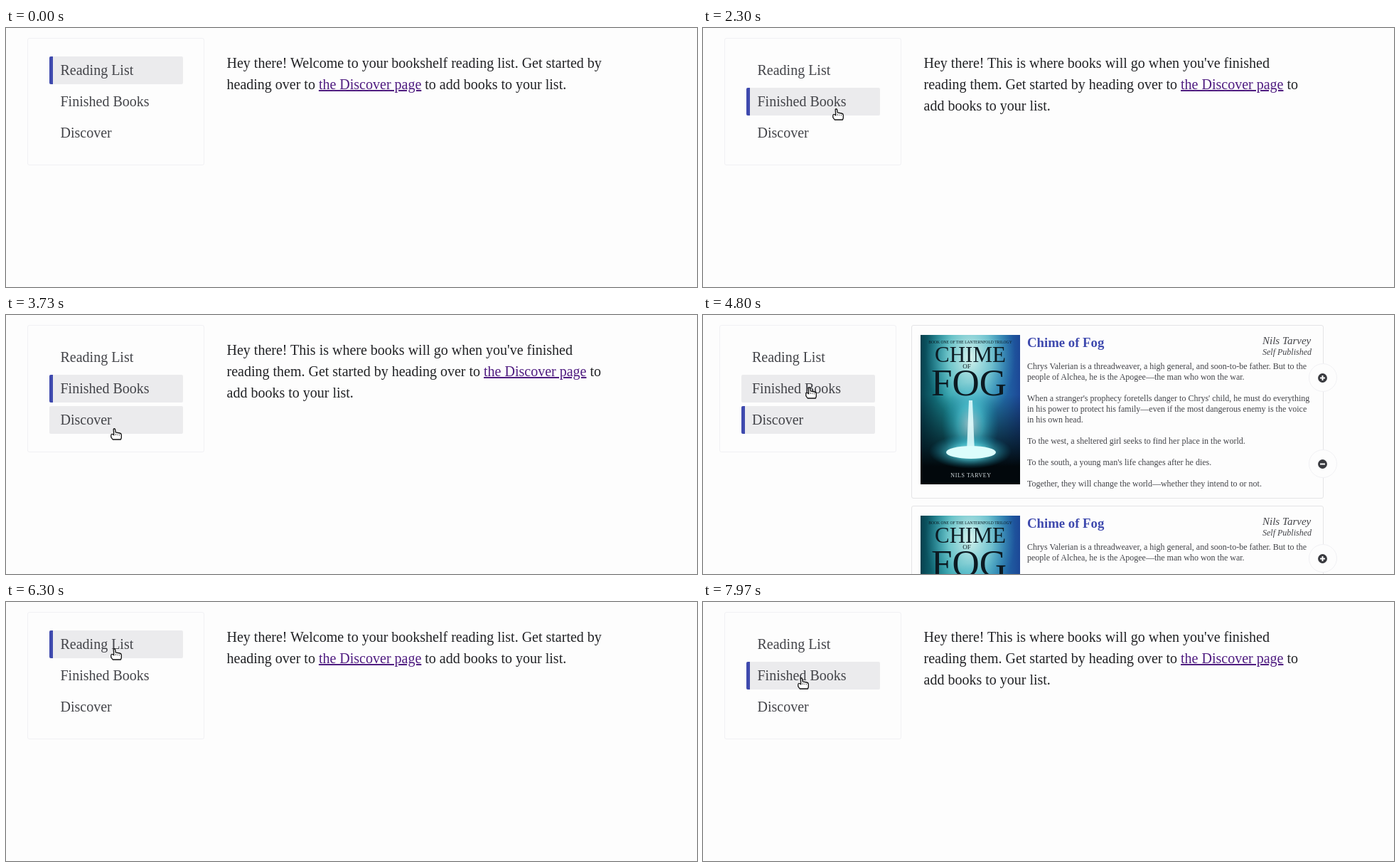
These frames come from a looping animation (972x364 px, 8000 ms). An HTML page:

```html
<!DOCTYPE html>
<html lang="en">
<head>
<meta charset="utf-8">
<title>Bookshelf</title>
<style>
  :root { --paper: #fdfdfd; --lit: #ebebed; --line: #f1f1f4; --edge: #e4e4e6; --text: #434449; --accent: #3f4aae; }
  html, body { margin: 0; width: 100%; height: 100%; overflow: hidden; background: var(--paper); }
  body { font-family: "Liberation Serif", "Times New Roman", serif; }
  .stage { position: absolute; left: 0; top: 0; width: 972px; height: 364px; overflow: hidden; color: var(--text); }
  .stage * { position: absolute; box-sizing: border-box; margin: 0; white-space: pre; }
  .stage a, .stage br { position: static; }

  /* navigation */
  nav { left: 30px; top: 14px; width: 249px; height: 179px; border: 1px solid var(--line); border-radius: 3px;
        animation: shift 8s step-end infinite; }
  .item { left: 30px; width: 188px; height: 39px; border-radius: 2px; font-size: 20px; line-height: 23px;
          padding: 8px 15px; }
  .item i { left: 0; top: 0; width: 5px; height: 39px; background: var(--accent); border-radius: 2px 0 0 2px; }
  .item:nth-child(1) { top: 25px; animation: lit1 8s step-end infinite; }
  .item:nth-child(2) { top: 69px; animation: lit2 8s step-end infinite; }
  .item:nth-child(3) { top: 113px; animation: lit3 8s step-end infinite; }

  /* pages and active markers share their timing */
  .reading { animation: reading 8s step-end infinite; }
  .finished { animation: finished 8s step-end infinite; }
  .discover { animation: discover 8s step-end infinite; }
  p.page { left: 310.5px; top: 34px; font-size: 20px; line-height: 30px; color: #212225; }
  a { color: #4f1c80; text-decoration: underline; }

  /* book cards */
  .card { left: 293px; top: 14px; width: 580px; height: 244px; border: 1px solid var(--edge); border-radius: 3px; }
  .card + .card { top: 268px; }
  .cover { left: 12px; top: 13px; width: 140px; height: 210px; }
  h2 { left: 162px; top: 13px; font-size: 18.75px; line-height: 21px; color: var(--accent); }
  .author, .press { left: 493px; font-style: italic; }
  .author { top: 13px; font-size: 15px; line-height: 16px; }
  .press { top: 30px; font-size: 12px; line-height: 14px; }
  .blurb { left: 162px; top: 49.5px; font-size: 12px; line-height: 15px; }
  .btn { left: 558px; width: 40px; height: 40px; border: 1px solid var(--line); border-radius: 50%; background: var(--paper); }
  .add { top: 53px; }
  .remove { top: 174px; }
  .btn svg { left: 12px; top: 13px; width: 13px; height: 13px; }
  .btn circle { fill: #38393e; }
  .btn path { stroke: var(--paper); stroke-width: 2; }

  .hand { left: -5px; top: 0; width: 16px; height: 17px; animation: hand 8s ease-in-out infinite; }

  @keyframes reading {
    0%, 74.375% { visibility: visible; }
    17.5%, 95%, 100% { visibility: hidden; }
  }
  @keyframes finished {
    0%, 48.375%, 74.375% { visibility: hidden; }
    17.5%, 63.375%, 95%, 100% { visibility: visible; }
  }
  @keyframes discover {
    0%, 63.375%, 100% { visibility: hidden; }
    48.375% { visibility: visible; }
  }
  /* the scrollbar moves the centred layout by half its width */
  @keyframes shift {
    0%, 63.375%, 100% { left: 30px; text-indent: .5px; }
    48.375% { left: 23px; text-indent: 0; }
  }
  @keyframes lit1 {
    0%, 70.75% { background: var(--lit); }
    17.5%, 95%, 100% { background: transparent; }
  }
  @keyframes lit2 {
    0%, 48.375%, 74.375% { background: transparent; }
    16%, 57%, 92.75%, 100% { background: var(--lit); }
  }
  @keyframes lit3 {
    0%, 63.375%, 100% { background: transparent; }
    34.5% { background: var(--lit); }
  }
  @keyframes hand {
    0%, 12.5% { transform: translate(205px, 372px); }
    16.875% { transform: translate(196px, 108px); }
    21.25% { transform: translate(196px, 106px); }
    26.625%, 31.25% { transform: translate(187px, 113px); }
    36.875% { transform: translate(152px, 157px); }
    38.75%, 55% { transform: translate(152px, 159px); }
    58.75% { transform: translate(149px, 103px); }
    60% { transform: translate(149px, 101px); }
    68.75% { transform: translate(151px, 97px); }
    70.375% { transform: translate(152px, 73px); }
    71.25%, 91.25% { transform: translate(152px, 65px); }
    94%, 100% { transform: translate(138px, 106px); }
  }
</style>
</head>
<body>
<svg width="0" height="0" style="position:absolute">
  <defs>
    <linearGradient id="sky">
      <stop offset="0" stop-color="#06404e"/>
      <stop offset=".3" stop-color="#1f9aa2"/>
      <stop offset=".6" stop-color="#2a9cc0"/>
      <stop offset="1" stop-color="#1c4796"/>
    </linearGradient>
    <radialGradient id="dawn" cx=".5" cy=".15" r=".45">
      <stop offset="0" stop-color="#d8f4ee"/>
      <stop offset=".5" stop-color="#86d2d6" stop-opacity=".75"/>
      <stop offset="1" stop-color="#3fa4bc" stop-opacity="0"/>
    </radialGradient>
    <linearGradient id="night" x2="0" y2="1">
      <stop offset=".4" stop-color="#03131c" stop-opacity="0"/>
      <stop offset=".75" stop-color="#03131c" stop-opacity=".8"/>
      <stop offset=".88" stop-color="#02080c"/>
    </linearGradient>
    <radialGradient id="glow">
      <stop offset="0" stop-color="#f2ffff"/>
      <stop offset=".45" stop-color="#58dcea" stop-opacity=".8"/>
      <stop offset="1" stop-color="#1090b0" stop-opacity="0"/>
    </radialGradient>
    <symbol id="cover" viewBox="0 0 140 210">
      <rect width="140" height="210" fill="url(#sky)"/>
      <rect width="140" height="210" fill="url(#dawn)"/>
      <rect width="140" height="210" fill="url(#night)"/>
      <ellipse cx="70" cy="125" rx="40" ry="58" fill="url(#glow)" opacity=".6"/>
      <ellipse cx="70" cy="164" rx="58" ry="24" fill="url(#glow)" opacity=".8"/>
      <path d="M68 92h5l3 72H65Z" fill="#e6ffff" opacity=".85"/>
      <ellipse cx="71" cy="165" rx="35" ry="9" fill="#dcfdfc"/>
      <g text-anchor="middle" font-family="Liberation Serif, Times New Roman, serif" fill="#0c1a22">
        <text x="70" y="12" font-size="5.6">BOOK ONE OF THE LANTERNFOLD TRILOGY</text>
        <text x="70" y="38" font-size="31">CHIME</text>
        <text x="65" y="47" font-size="9">OF</text>
        <text x="68" y="85" font-size="53">FOG</text>
        <text x="71" y="200" font-size="8" letter-spacing=".6" fill="#d4dce0">NILS TARVEY</text>
      </g>
    </symbol>
  </defs>
</svg>

<div class="stage">
  <nav>
    <div class="item"><i class="reading"></i>Reading List</div>
    <div class="item"><i class="finished"></i>Finished Books</div>
    <div class="item"><i class="discover"></i>Discover</div>
  </nav>

  <p class="page reading">Hey there! Welcome to your bookshelf reading list. Get started by<br>heading over to <a>the Discover page</a> to add books to your list.</p>
  <p class="page finished">Hey there! This is where books will go when you've finished<br>reading them. Get started by heading over to <a>the Discover page</a> to<br>add books to your list.</p>

  <div class="discover" id="results">
    <div class="card">
      <svg class="cover"><use href="#cover"/></svg>
      <h2>Chime of Fog</h2>
      <div class="author">Nils Tarvey</div>
      <div class="press">Self Published</div>
      <p class="blurb">Chrys Valerian is a threadweaver, a high general, and soon-to-be father. But to the<br>people of Alchea, he is the Apogee—the man who won the war.<br><br>When a stranger's prophecy foretells danger to Chrys' child, he must do everything<br>in his power to protect his family—even if the most dangerous enemy is the voice<br>in his own head.<br><br>To the west, a sheltered girl seeks to find her place in the world.<br><br>To the south, a young man's life changes after he dies.<br><br>Together, they will change the world—whether they intend to or not.</p>
      <div class="btn add"><svg viewBox="0 0 13 13"><circle cx="6.5" cy="6.5" r="6.4"/><path d="M3 6.5h7M6.5 3v7"/></svg></div>
      <div class="btn remove"><svg viewBox="0 0 13 13"><circle cx="6.5" cy="6.5" r="6.4"/><path d="M3 6.5h7"/></svg></div>
    </div>
  </div>

  <svg class="hand" viewBox="0 0 16 17">
    <path d="M4.2 1.8C4.2 .4 6.4 .4 6.6 1.8L7.2 5.8 13 7Q15.3 7.6 15.3 9.4V13.6L14.4 16H3.2L.8 12.6V10C.8 8.4 2.4 8 3.4 8.8L4.8 9.8Z" fill="#fff" stroke="#111" stroke-width="1.3" stroke-linejoin="round"/>
    <path d="M7.5 8v2M10 8.4v1.8M12.5 8.8v1.6" stroke="#333" stroke-width=".8"/>
  </svg>
</div>

<script>
  const results = document.getElementById("results");
  results.append(results.querySelector(".card").cloneNode(true));
</script>
</body>
</html>
```
